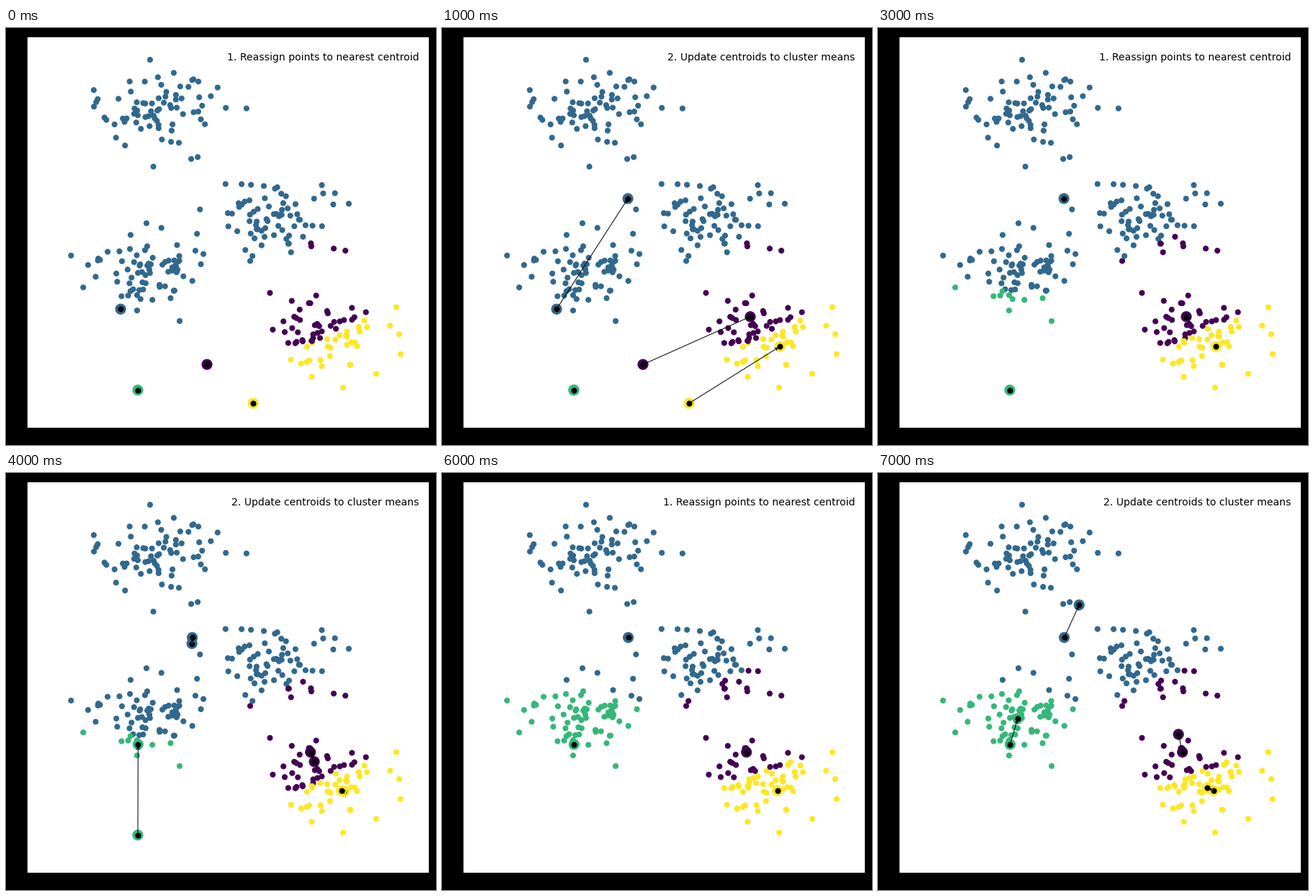
Write a matplotlib script that moves like this. It is 597 px wide and 579 px high and loops after 8000 ms.

```python
import numpy as np
import matplotlib.pyplot as plt
from matplotlib.animation import FuncAnimation

W, H, DPI = 597, 579, 72
K = 4            # clusters
STEPS = 8        # one second each
LEFT, BOTTOM, AX_W, AX_H = 29.1, 23.8, 558, 543.6

plt.rcParams["font.family"] = "DejaVu Sans"


def make_points(per_blob=75, spread=0.6):
    rng = np.random.RandomState(0)
    hubs = rng.uniform(-10, 10, size=(K, 2))
    pts = np.concatenate([rng.normal(hub, spread, (per_blob, 2)) for hub in hubs])
    order = np.arange(len(pts))
    rng.shuffle(order)
    return pts[order]


def assign(pts, centers):
    gaps = pts[:, None] - centers[None]
    return (gaps ** 2).sum(axis=2).argmin(axis=1)


def cluster_means(pts, labels, old):
    """Mean of each cluster; an empty cluster keeps its old center."""
    return np.array([pts[labels == k].mean(axis=0) if (labels == k).any() else old[k]
                     for k in range(K)])


def kmeans_rounds(pts, count):
    centers = np.random.RandomState(2).randn(K, 2)
    rounds = []
    for _ in range(count):
        labels = assign(pts, centers)
        new = cluster_means(pts, labels, centers)
        rounds.append((labels, centers, new))
        centers = new
    return rounds


points = make_points()
rounds = kmeans_rounds(points, (STEPS + 2) // 3)

fig = plt.figure(figsize=(W / DPI, H / DPI), dpi=DPI, facecolor="black")
ax = fig.add_axes([LEFT / W, BOTTOM / H, AX_W / W, AX_H / H])


def dots(xy, color, size, **kw):
    ax.scatter(xy[:, 0], xy[:, 1], c=color, s=size, **kw)


def draw_centers(centers):
    dots(centers, np.arange(K), 200, cmap="viridis", vmin=0, vmax=K - 1)
    dots(centers, "black", 50)


def caption(text):
    ax.text(3.8, 9.5, text, ha="right", va="top", size=14)


def draw(step):
    ax.clear()
    ax.set(xlim=(-4, 4), ylim=(-2, 10), xticks=[], yticks=[])
    labels, old, new = rounds[step // 3]
    phase = step % 3

    dots(points, labels, 50, cmap="viridis", vmin=0, vmax=K - 1)
    if phase == 0:
        draw_centers(old)
        caption("1. Reassign points to nearest centroid")
    elif phase == 1:
        draw_centers(old)
        draw_centers(new)
        for start, end in zip(old, new):
            if not np.allclose(start, end):
                ax.annotate("", end, start, arrowprops=dict(arrowstyle="->", linewidth=1))
        caption("2. Update centroids to cluster means")
    else:
        draw_centers(new)
    return []


anim = FuncAnimation(fig, draw, frames=STEPS, interval=1000,
                     init_func=lambda: draw(0), repeat=True, repeat_delay=0)
plt.show()
```
